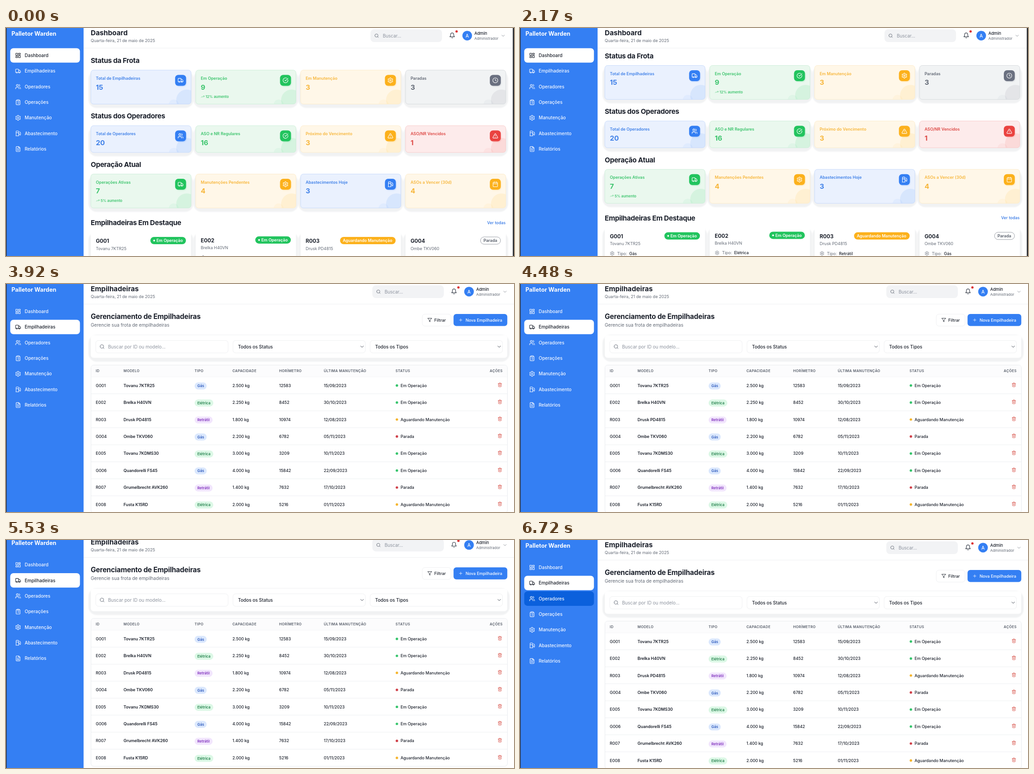
These frames come from a looping animation (1115x502 px, 8000 ms). An HTML page:

```html
<!DOCTYPE html>
<html lang="pt-BR">
<head>
<meta charset="utf-8">
<title>Painel de frota</title>
<style>
html, body { margin: 0; width: 100%; height: 100%; overflow: hidden; background: #fff; }
svg { display: block; width: 100vw; height: 100vh; font-family: Inter, "Open Sans", sans-serif; }
</style>
</head>
<body>
<svg id="stage" viewBox="0 0 1115 502"></svg>
<script>
const LOOP = 8000, STEP = 70;
const BLUE = '#347ff3', GREEN = '#22c45e', AMBER = '#fcb11c', GRAY = '#6a7080', RED = '#ea4340';
const INK = '#1b202b', MUTED = '#626975';

const ring = (x, y, r) => `M${x - r} ${y}a${r} ${r} 0 1 0 ${2 * r} 0a${r} ${r} 0 1 0 ${-2 * r} 0`;

function gear() {
  let d = '';
  for (let i = 0; i < 48; i++) {
    const a = i / 48 * 2 * Math.PI;
    const r = 8.9 + 1.5 * Math.tanh(2 * Math.cos(6 * a));
    d += `${i ? 'L' : 'M'}${(12 + r * Math.sin(a)).toFixed(2)} ${(12 - r * Math.cos(a)).toFixed(2)}`;
  }
  return d + 'Z' + ring(12, 12, 3);
}

const ICONS = {
  grid: 'M3 3h7v9H3zM14 3h7v5h-7zM14 12h7v9h-7zM3 16h7v5H3z',
  truck: 'M14 18V6a2 2 0 0 0-2-2H4a2 2 0 0 0-2 2v11a1 1 0 0 0 1 1h2M15 18H9M19 18h2a1 1 0 0 0 1-1v-4l-4-5h-4' + ring(17, 18, 2) + ring(7, 18, 2),
  users: 'M16 21v-2a4 4 0 0 0-4-4H6a4 4 0 0 0-4 4v2M22 21v-2a4 4 0 0 0-3-3.9M16 3.1a4 4 0 0 1 0 7.8' + ring(9, 7, 4),
  list: 'M8 2h8v4H8zM16 4h2a2 2 0 0 1 2 2v14a2 2 0 0 1-2 2H6a2 2 0 0 1-2-2V6a2 2 0 0 1 2-2h2M12 11h4M12 16h4M8 11h.01M8 16h.01',
  gear: gear(),
  fuel: 'M3 22h12M4 9h10M14 22V4a2 2 0 0 0-2-2H6a2 2 0 0 0-2 2v18M14 13h2a2 2 0 0 1 2 2v2a2 2 0 0 0 4 0V9.8L18 5',
  file: 'M15 2H6a2 2 0 0 0-2 2v16a2 2 0 0 0 2 2h12a2 2 0 0 0 2-2V7zM14 2v6h6M10 9H8M16 13H8M16 17H8',
  check: 'M21.8 10A10 10 0 1 1 17 3.3M9 11l3 3L22 4',
  clock: ring(12, 12, 10) + 'M12 6v6l4 2',
  alert: 'M21.7 18l-8-14a2 2 0 0 0-3.4 0l-8 14A2 2 0 0 0 4 21h16a2 2 0 0 0 1.7-3M12 9v4M12 17h.01',
  date: 'M8 2v4M16 2v4M3 10h18M5 4h14a2 2 0 0 1 2 2v14a2 2 0 0 1-2 2H5a2 2 0 0 1-2-2V6a2 2 0 0 1 2-2',
  bell: 'M6 8a6 6 0 0 1 12 0c0 7 3 9 3 9H3s3-2 3-9M10.3 21a2 2 0 0 0 3.4 0',
  search: ring(11, 11, 8) + 'M21 21l-4.3-4.3',
  down: 'M4 8l8 8 8-8',
  trash: 'M3 6h18M19 6v14a2 2 0 0 1-2 2H7a2 2 0 0 1-2-2V6M8 6V4a2 2 0 0 1 2-2h4a2 2 0 0 1 2 2v2M10 11v6M14 11v6',
  funnel: 'M22 3H2l8 9.5V19l4 2v-8.5z',
  plus: 'M4 12h16M12 4v16',
  trend: 'M22 7l-8.5 8.5-5-5L2 17M16 7h6v6'
};

// Every y given to text and icon is a vertical centre.
const text = (x, y, s, size, weight, fill, more = '') =>
  `<text x="${x}" y="${(y + size * .36).toFixed(2)}" font-size="${size}" font-weight="${weight}" fill="${fill}" ${more}>${s}</text>`;
const rect = (x, y, w, h, r, fill, more = '') =>
  `<rect x="${x}" y="${y}" width="${w}" height="${h}" rx="${r}" fill="${fill}" ${more}/>`;
const disc = (x, y, r, fill, more = '') => `<circle cx="${x}" cy="${y}" r="${r}" fill="${fill}" ${more}/>`;
const icon = (name, x, y, size, color, width = 2) =>
  `<path d="${ICONS[name]}" transform="translate(${x - size / 2} ${y - size / 2}) scale(${size / 24})" fill="none" stroke="${color}" stroke-width="${width}" stroke-linecap="round" stroke-linejoin="round"/>`;
const halo = (x, y, w, h) => rect(x - 5, y + 1, w + 10, h + 7.5, 18, '#f1f2f3', 'filter="url(#soft)"');

// Sidebar
const NAV = [['grid', 'Dashboard'], ['truck', 'Empilhadeiras'], ['users', 'Operadores'], ['list', 'Operações'],
  ['gear', 'Manutenção'], ['fuel', 'Abastecimento'], ['file', 'Relatórios']];
const navY = i => 60.4 + 34.35 * i;

function sidebar(active) {
  const items = NAV.map(([name, label], i) => {
    const y = navY(i), on = i === active, color = on ? INK : '#f6f9ff';
    return (on ? rect(9.3, y - 16, 153, 31.8, 7, '#fff') : '') +
      `<rect class="hover${i}" x="9.3" y="${y - 16}" width="153" height="31.8" rx="7" fill="#0b60dc" opacity="0"/>` +
      icon(name, 26.5, y, 13, color) + text(41, y, label, 10, 500, color);
  });
  return rect(0, -10, 170.3, 530, 0, BLUE) + text(12, 12, 'Palletor Warden', 12.7, 700, '#fff') + items.join('');
}

// Top bar; dx moves the right-hand group
function header(title, dx) {
  return rect(170.3, 0, 945, 44, 0, '#fff') + rect(170.3, 43.7, 945, 1, 0, '#eef0f2') +
    text(186, 10.4, title, 15.2, 700, INK) +
    text(186, 27.7, 'Quarta-feira, 21 de maio de 2025', 9.05, 400, MUTED) +
    `<g transform="translate(${dx})">` +
    rect(800, 3, 157, 28, 8, '#f2f3f5') + icon('search', 813.5, 17, 10.5, '#5f6672') +
    text(827, 17, 'Buscar...', 9.9, 400, '#8d939e') +
    icon('bell', 979.3, 16.5, 13.5, '#333a46') + disc(989, 7.5, 2.6, '#dc3535') +
    disc(1012.3, 16.8, 10.6, BLUE) + text(1012.3, 17, 'A', 10, 500, '#fff', 'text-anchor="middle"') +
    text(1028, 12, 'Admin', 9.2, 500, INK) + text(1028, 23.2, 'Administrador', 7.95, 400, MUTED) +
    icon('down', 1091.2, 17, 8.5, '#5f6672') + '</g>';
}

// Dashboard
const TONES = {
  blue: [BLUE, '#eaf1fe', '#c5d9fb', '#3f80e8'],
  green: [GREEN, '#eaf8ee', '#cbeed7', '#3bc46c'],
  amber: [AMBER, '#fff7e8', '#fdebc9', '#f7b63a'],
  gray: [GRAY, '#f1f3f4', '#d5d8dc', '#626975'],
  red: [RED, '#fdebeb', '#f8c9c8', '#dd4844']
};
const SECTIONS = [
  ['Status da Frota', 71.5, 92.7, 74.8, [
    ['blue', 'Total de Empilhadeiras', 15, 'truck'], ['green', 'Em Operação', 9, 'check', '12% aumento'],
    ['amber', 'Em Manutenção', 3, 'gear'], ['gray', 'Paradas', 3, 'clock']]],
  ['Status dos Operadores', 194, 215, 59, [
    ['blue', 'Total de Operadores', 20, 'users'], ['green', 'ASO e NR Regulares', 16, 'check'],
    ['amber', 'Próximo do Vencimento', 3, 'alert'], ['red', 'ASO/NR Vencidos', 1, 'alert']]],
  ['Operação Atual', 300.5, 321.5, 74.8, [
    ['green', 'Operações Ativas', 7, 'truck', '5% aumento'], ['amber', 'Manutenções Pendentes', 4, 'gear'],
    ['blue', 'Abastecimentos Hoje', 3, 'fuel'], ['amber', 'ASOs a Vencer (30d)', 4, 'date']]]
];
const MACHINES = [
  ['G001', 'Tovanu 7KTR25', 'Gás', '12583', 'Em Operação'],
  ['E002', 'Brelka H40VN', 'Elétrica', '08452', 'Em Operação'],
  ['R003', 'Drusk PD4815', 'Retrátil', '10974', 'Aguardando Manutenção'],
  ['G004', 'Ombe TKV060', 'Gás', '06782', 'Parada']
];
const colX = i => 186.2 + 230.25 * i;
const heading = (y, s) => text(186, y, s, 15.2, 700, INK, 'letter-spacing="-.32"');

function card(i, y, h, [tone, label, value, name, trend]) {
  const [main, fill, edge, ink] = TONES[tone], x = colX(i), w = 220, id = `c${i}-${Math.round(y)}`;
  return `<clipPath id="${id}">${rect(x, y, w, h, 6, '#000')}</clipPath>` +
    rect(x, y, w, h, 6, fill) +
    `<g clip-path="url(#${id})">` + disc(x + w - 9.5, y + h - 9, 23, main, 'opacity=".1"') +
    disc(x + w - 38, y + h + 1, 11, main, 'opacity=".05"') + '</g>' +
    rect(x, y, w, h, 6, 'none', `stroke="${edge}" stroke-width=".9"`) +
    text(x + 11, y + 17.9, label, 8.95, 600, ink) + text(x + 11, y + 37.4, value, 15.2, 700, ink) +
    rect(x + 186, y + 12, 24, 24, 7, main, 'opacity=".22" filter="url(#soft)"') +
    rect(x + 185, y + 10.5, 24, 24, 7, main) + icon(name, x + 197, y + 22.5, 13, '#fff') +
    (trend ? icon('trend', x + 15.3, y + 58.5, 7.8, ink) + text(x + 21.5, y + 58.5, trend, 7.8, 600, ink) : '');
}

function badge(x, y, status) {
  if (status === 'Parada')
    return rect(x + 164.5, y - 8, 44, 16, 8, '#fff', 'stroke="#8f949c" stroke-width=".9"') + text(x + 171, y, status, 9, 600, '#555c68');
  if (status === 'Em Operação')
    return rect(x + 130.7, y - 8, 78, 16, 8, GREEN) + disc(x + 139, y, 2, '#fff', 'class="pulse"') + text(x + 144, y, status, 8.95, 600, '#fff');
  return rect(x + 86.5, y - 8, 122, 16, 8, AMBER) + text(x + 92.5, y, status, 8.9, 600, '#fff');
}

function machine(i, [id, model, type, hours, status]) {
  const x = colX(i), y = i === 1 ? 446.7 : 448;
  return rect(x, y, 220, 120, 6, '#fff') +
    text(x + 11, y + 21.3, id, 11.5, 700, INK) + text(x + 11, y + 37.5, model, 9, 400, MUTED) +
    badge(x, y + 20, status) +
    icon('gear', x + 16.2, y + 58.6, 10, MUTED) + text(x + 27, y + 58.6, 'Tipo:', 9, 400, MUTED) + text(x + 53.5, y + 58.6, type, 9, 500, INK) +
    icon('clock', x + 16.2, y + 78.4, 10, MUTED) + text(x + 27, y + 78.4, 'Horímetro:', 9, 400, MUTED) + text(x + 82.5, y + 78.4, hours, 9.1, 600, INK);
}

function dashboard() {
  const body = SECTIONS.map(([title, ty, y, h, cards]) =>
    heading(ty, title) + cards.map((c, i) => halo(colX(i), y, 220, h)).join('') +
    cards.map((c, i) => card(i, y, h, c)).join('')).join('');
  return `<g id="scroller">` + body + heading(428.3, 'Empilhadeiras Em Destaque') +
    text(1096.5, 428.3, 'Ver todas', 8.9, 500, '#2f74e4', 'text-anchor="end"') +
    MACHINES.map((m, i) => halo(colX(i), 448, 220, 120)).join('') +
    MACHINES.map((m, i) => machine(i, m)).join('') + '</g>' + header('Dashboard', 0) +
    `<g clip-path="url(#bar)"><rect id="veil" x="186" width="109" height="13" fill="#333" opacity=".08" filter="url(#blur)"/></g>` +
    sidebar(0) + rect(1112.4, 0, 3, 502, 0, '#25272b');
}

// Forklift table
const HEADS = [[197, 'ID'], [258, 'MODELO'], [414, 'TIPO'], [497, 'CAPACIDADE'], [599.5, 'HORÍMETRO'], [697.5, 'ÚLTIMA MANUTENÇÃO'], [855, 'STATUS']];
const TYPES = { G: ['Gás', 26.5, '#dbe8fd', '#2b59bd'], E: ['Elétrica', 41, '#dcf8e6', '#23804c'], R: ['Retrátil', 39.5, '#f2e6fd', '#7f30bd'] };
const STATES = { op: ['Em Operação', '#35c46b'], wait: ['Aguardando Manutenção', '#f5b52e'], stop: ['Parada', '#cf3f48'] };
const ROWS = [
  'G001|Tovanu 7KTR25|2.500|12583|15/09|op', 'E002|Brelka H40VN|2.250|8452|30/10|op',
  'R003|Drusk PD4815|1.800|10974|12/08|wait', 'G004|Ombe TKV060|2.200|6782|05/11|stop',
  'E005|Tovanu 7KDMS30|3.000|3209|10/11|op', 'G006|Quandorelli FS45|4.000|15842|22/09|op',
  'R007|Grumelbrecht AVK260|1.400|7632|17/10|stop', 'E008|Fusta K15RD|2.000|5216|01/11|wait'
];

function row(line, i) {
  const [id, model, load, hours, day, state] = line.split('|'), y = 223.5 + 37.43 * i;
  const [type, w, fill, ink] = TYPES[id[0]], [status, dot] = STATES[state];
  const cell = (x, s, weight = 450) => text(x, y, s, 8.95, weight, INK);
  return cell(197, id) + cell(258, model, 600) + rect(414, y - 6.7, w, 15.4, 7.7, fill) + text(420, y + 1, type, 7.9, 600, ink) +
    cell(497, load + ' kg') + cell(599.5, hours) + cell(697.5, day + '/2023') +
    disc(858, y, 2.7, dot) + cell(866, status) + icon('trash', 1084, y - 1.5, 10.3, '#d5483f') +
    (i < 7 ? rect(186.5, y + 17.8, 914, .9, 0, '#eceef1') : '');
}

function fleet() {
  const line = 'stroke="#eff0f2" stroke-width="1"';
  const select = (x, s) => rect(x, 124.3, 290.5, 27.5, 6, '#fff', line) + text(x + 11, 138, s, 10, 450, INK) + icon('down', x + 283.3, 138, 9, '#333a46', 2.6);
  return text(186, 71.5, 'Gerenciamento de Empilhadeiras', 15.3, 700, INK, 'letter-spacing="-.18"') +
    text(186, 90, 'Gerencie sua frota de empilhadeiras', 10.1, 400, MUTED) +
    rect(913.7, 66.3, 63, 26.4, 6, '#fff', line) + icon('funnel', 930, 79.3, 10.5, INK) + text(940, 79.5, 'Filtrar', 9.1, 500, INK) +
    rect(982.3, 66, 118, 26.6, 6, BLUE) + icon('plus', 998, 79.3, 9, '#fff') + text(1008.7, 79.5, 'Nova Empilhadeira', 9, 500, '#fff') +
    halo(186.2, 111, 914, 51.5) + rect(186.2, 113, 914, 49.5, 6, '#fff') +
    rect(197, 124.3, 290.5, 27.5, 6, '#fff', line) + icon('search', 211, 138, 11.5, '#5f6672') +
    text(224, 138, 'Buscar por ID ou modelo...', 10.05, 400, '#8d939e') +
    select(498.2, 'Todos os Status') + select(799.2, 'Todos os Tipos') +
    rect(186.5, 178.5, 914, 325.5, 6, '#fff', 'stroke="#e8ebef" stroke-width="1"') +
    rect(187, 179, 913, 25.3, 5, '#fcfcfd') + rect(187, 204, 913, .8, 0, '#f3f4f6') +
    HEADS.map(([x, s]) => text(x, 191.5, s, 7.65, 600, '#555c68', 'letter-spacing=".37"')).join('') +
    text(1090, 191.5, 'AÇÕES', 7.65, 600, '#555c68', 'letter-spacing=".37" text-anchor="end"') +
    ROWS.map(row).join('') + header('Empilhadeiras', 4) + sidebar(1);
}

const stage = document.getElementById('stage');
stage.innerHTML = `<defs>
  <filter id="soft" x="-10%" y="-20%" width="120%" height="140%"><feGaussianBlur stdDeviation=".9"/></filter>
  <filter id="blur" x="-10%" y="-80%" width="120%" height="260%"><feGaussianBlur stdDeviation="1.6"/></filter>
  <clipPath id="bar"><rect x="170" width="945" height="44"/></clipPath></defs>` +
  rect(0, 0, 1115, 502, 0, '#fff') +
  `<g id="home">${dashboard()}</g><g id="fleet">${fleet()}</g>` + rect(0, 0, 1.4, 502, 0, '#2a2d33');

const find = s => stage.querySelector(s);
const home = find('#home'), list = find('#fleet'), scroller = find('#scroller'), veil = find('#veil');
const pulses = stage.querySelectorAll('.pulse');
const hoverHome = home.querySelector('.hover1');
const hoverUsers = list.querySelector('.hover2'), hoverOps = list.querySelector('.hover3');

const SWITCH = 3850;
const NUDGES = [5040, 5110, 5180, 5320, 5390, 5530];
const ramp = (t, a, b) => Math.min(1, Math.max(0, (t - a) / (b - a)));

// One pixel per nudge down, then a steady return
function pageShift(t) {
  const down = NUDGES.filter(n => t >= n).length;
  const up = Math.min(6, Math.max(0, Math.floor((t - 5600) / STEP)));
  return (up - down) * .97;
}

function draw(time) {
  const t = Math.floor(time / STEP) * STEP;
  const onHome = t < SWITCH;
  home.setAttribute('display', onHome ? 'inline' : 'none');
  list.setAttribute('display', onHome ? 'none' : 'inline');

  const scroll = 32.7 * (1 - (1 - ramp(t, 2030, 3220)) ** 3);
  scroller.setAttribute('transform', `translate(0 ${-scroll})`);
  veil.setAttribute('y', 65.5 - scroll);
  const glow = .75 + .25 * Math.cos(t / 1000 * Math.PI);
  pulses.forEach(p => p.setAttribute('opacity', glow));
  hoverHome.setAttribute('opacity', ramp(t, 3570, 3780));

  list.setAttribute('transform', `translate(0 ${pageShift(t)})`);
  hoverOps.setAttribute('opacity', .6 * ramp(t, 6300, 6440) * (1 - ramp(t, 6440, 6650)));
  hoverUsers.setAttribute('opacity', ramp(t, 6440, 6720));
}

function tick() {
  draw(performance.now() % LOOP);
  requestAnimationFrame(tick);
}
tick();
</script>
</body>
</html>
```
